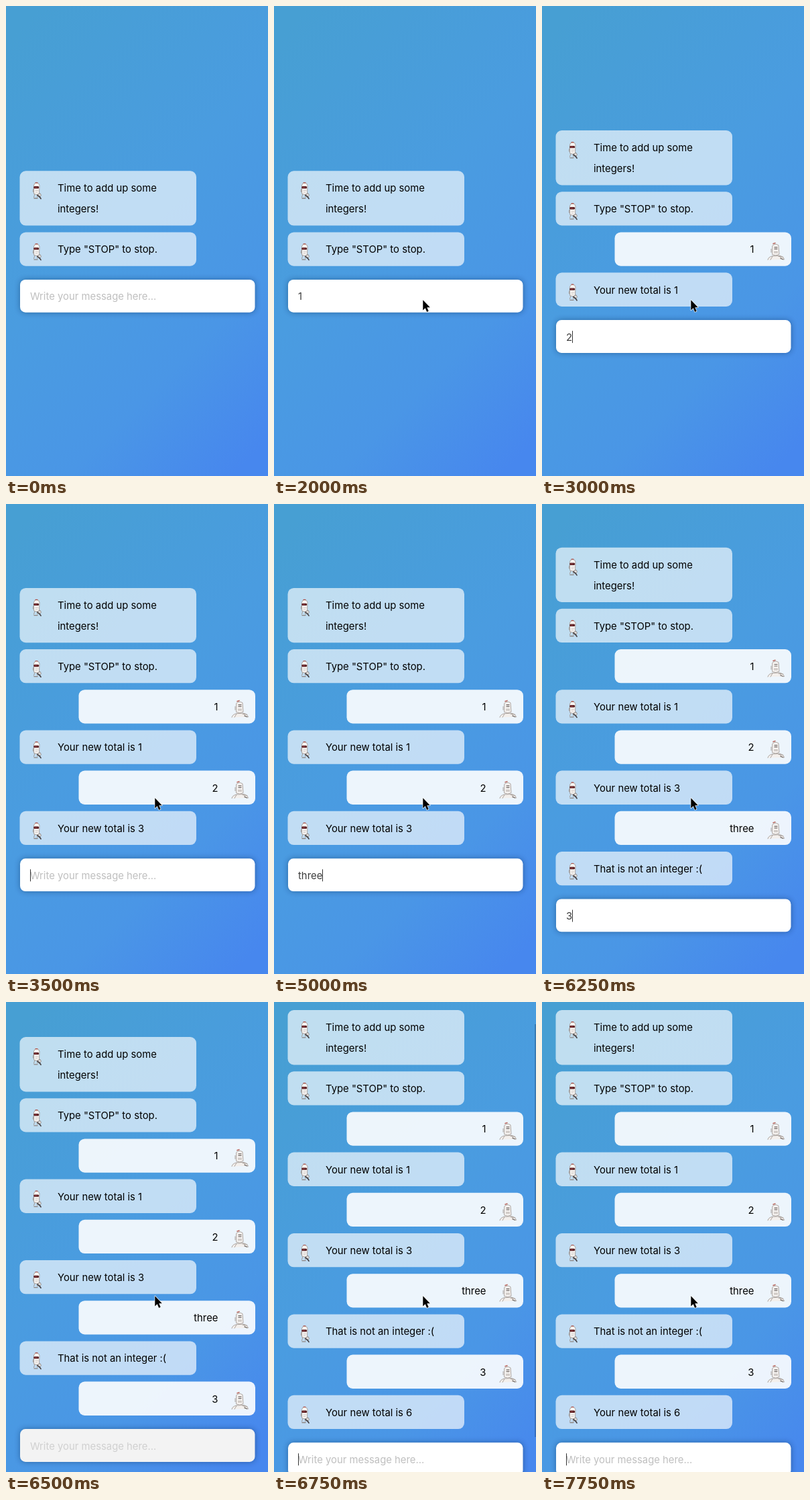
These frames come from a looping animation (391x699 px, 8000 ms). An HTML page:

```html
<!DOCTYPE html>
<html lang="en">
<head>
<meta charset="utf-8">
<title>Adding chat</title>
<style>
html, body { margin: 0; width: 100%; height: 100%; overflow: hidden; }
svg { display: block; width: 391px; height: 699px; }
text { font: 14.85px Inter, "Open Sans", sans-serif; white-space: pre; }
</style>
</head>
<body>
<svg id="stage" viewBox="0 0 391 699" xmlns="http://www.w3.org/2000/svg">
  <defs>
    <linearGradient id="sky" gradientUnits="userSpaceOnUse" x1="-50" y1="104" x2="441" y2="595">
      <stop offset="0" stop-color="#479fd3"/>
      <stop offset=".45" stop-color="#4a9ce0"/>
      <stop offset=".75" stop-color="#4a96e6"/>
      <stop offset="1" stop-color="#4787ee"/>
    </linearGradient>
    <filter id="blur" x="-20%" y="-60%" width="140%" height="220%"><feGaussianBlur stdDeviation="4.5"/></filter>
    <g id="bot" stroke-linecap="round" stroke-linejoin="round">
      <path d="M4.5 9 Q1.5 11 2.5 15 M5 18 L3.5 23 M8 18 L9 23" fill="none" stroke="#a39b97"/>
      <path d="M3.5 5 Q4 1.5 7.5 1.5 Q11.5 1.5 12 5 L11.5 18 Q8 20 4 18 Z" fill="#f7f5f3" stroke="#9b918c" stroke-width=".8"/>
      <path d="M6 1.3 H9" stroke="#b0524a" stroke-width="1.2"/>
      <rect x="3.2" y="6.6" width="8" height="3.4" rx="1.6" fill="#5b2226"/>
      <path d="M5 8.3 H8" stroke="#a8484a" stroke-width=".8"/>
      <path d="M6 13 H10 M6 15.5 H9" stroke="#c4bcb8" stroke-width=".8"/>
      <path d="M9 19 L13 17 L14.5 20 L12 23 Z" fill="#e5e1de" stroke="#77706d" stroke-width=".7"/>
      <path d="M9 20 L12 22 L14 25" fill="none" stroke="#464245" stroke-width="1.7"/>
      <path d="M4 24.5 H9" stroke="#8c8481" stroke-width="1.3"/>
    </g>
    <g id="human" stroke-linecap="round" stroke-linejoin="round" fill="none" stroke="#a59c97" stroke-width=".9">
      <path d="M8 5 Q12 1 17 4.5 L18 18 Q13 21 8 18.5 Z" fill="#f6f3f1"/>
      <path d="M9 2.2 L12 1.2" stroke="#bd6b62" stroke-width="1.6"/>
      <path d="M11 7.5 H15 M11 10 H15" stroke="#6e6663" stroke-width="1.2"/>
      <path d="M11 13.5 V16 M13 13.5 V16 M15 13.5 V16 M6 10 V15"/>
      <path d="M1 26 Q2 21.5 8 20.5 L18 20 Q24 20.5 25.5 25.5" fill="#f3efec"/>
      <path d="M5 26 L8 21 M19 20.5 L21 24 M17 21 L24 22"/>
      <path d="M20 24 L24 25.5" stroke="#77706c" stroke-width="1.3"/>
    </g>
  </defs>
  <rect id="back" width="391" height="699" fill="url(#sky)"/>
  <g id="chat"></g>
  <g id="field">
    <rect x="21" width="351" height="49" rx="8" fill="#06244c" opacity=".42" filter="url(#blur)"/>
    <rect id="box" x="21" width="350.5" height="48.8" rx="8"/>
    <text id="entry" x="36" y="30.6"></text>
    <rect id="caret" y="16" width="1" height="18" fill="#333"/>
  </g>
  <rect id="bar" x="389" y="33" width="2" height="614" fill="#16304f"/>
  <path id="arrow" d="M0 0 V15.2 L3.4 12 L5.9 17.6 L8.4 16.5 L6 11 H10.6 Z" fill="#000" stroke="#fff" stroke-width="1.3" stroke-linejoin="round" paint-order="stroke"/>
</svg>
<script>
const LOOP = 8000, STEP = 60.2, HINT = "Write your message here...";
const $ = id => document.getElementById(id);

// A leading ">" marks a message from the user.
const messages = ["Time to add up some|integers!", 'Type "STOP" to stop.', ">1", "Your new total is 1",
  ">2", "Your new total is 3", ">three", "That is not an integer :(", ">3", "Your new total is 6"];

// [start, message count, top of the chat]
const scenes = [[0, 2, 245.3], [2500, 4, 185.1], [3500, 6, 124.9], [5250, 8, 64.7], [6500, 9, 52.1], [6750, 10, 12.1]];

// [start, typed text, caret shown]
const typing = [[0, "", 0], [750, "", 1], [1250, "", 0], [1500, "1", 1], [2000, "1", 0], [2500, "", 1],
  [3000, "2", 1], [3500, "", 1], [4000, "", 0], [4500, "t", 1], [4750, "thre", 1], [5000, "three", 1],
  [5250, "", 1], [5750, "", 0], [6250, "3", 1], [6500, "", 0], [6750, "", 1], [7250, "", 0], [7750, "", 1]];

const pointer = [[0, -50, -50], [250, 231.3, 388.3], [500, 221.3, 437.3], [750, 222.3, 437.3]];
const scrollbar = [[0, 0], [6750, .3], [7000, .15], [7250, 0]];

const at = (track, t) => track.findLast(key => key[0] <= t);
const offset = i => i ? 91.1 + STEP * (i - 1) : 0;

function add(parent, tag, attrs, text = "") {
  const el = document.createElementNS("http://www.w3.org/2000/svg", tag);
  for (const name in attrs) el.setAttribute(name, attrs[name]);
  el.textContent = text;
  return parent.appendChild(el);
}

function bubble(message, i) {
  const mine = message[0] === ">";
  const lines = message.replace(">", "").split("|");
  const g = add($("chat"), "g", { transform: `translate(0 ${offset(i)})` });
  add(g, "rect", { x: mine ? 108.5 : 20.5, width: 263.5, height: lines.length > 1 ? 81.3 : 50.3, rx: 9,
    fill: "#fff", opacity: mine ? .9 : .66 });
  lines.forEach((line, n) => add(g, "text", { x: mine ? 316.5 : 77, y: 31 + n * 31,
    "text-anchor": mine ? "end" : "start" }, line));
  const face = add(g, "use", { href: mine ? "#human" : "#bot", x: mine ? 336 : 38, y: mine ? 15 : 16.2 });
  return { g, face };
}

const bubbles = messages.map(bubble);

function render(t) {
  const [, count, top] = at(scenes, t);
  const [, typed, caretOn] = at(typing, t);
  const [, px, py] = at(pointer, t);
  const locked = t >= 6500 && t < 6750;

  bubbles.forEach(({ g }, i) => g.setAttribute("display", i < count ? "inline" : "none"));
  // The first user portrait loads a moment late.
  bubbles[2].face.setAttribute("display", t < 2750 ? "none" : "inline");
  $("chat").setAttribute("transform", `translate(0 ${top})`);
  $("field").setAttribute("transform", `translate(0 ${top + offset(count - 1) + 70.5})`);

  $("box").setAttribute("fill", locked ? "#f3f3f3" : "#fff");
  $("entry").textContent = typed || HINT;
  $("entry").setAttribute("fill", typed ? "#3c3c3c" : locked ? "#d0d0d0" : "#bfbfbf");
  $("caret").setAttribute("x", 36 + (typed ? Math.round($("entry").getComputedTextLength()) : 0));
  $("caret").setAttribute("opacity", caretOn);

  $("arrow").setAttribute("transform", `translate(${px} ${py})`);
  $("bar").setAttribute("opacity", at(scrollbar, t)[1]);
  // The page grows once the chat no longer fits.
  $("back").setAttribute("transform", t >= 6750 ? "scale(1 1.06)" : "");
}

const start = performance.now();
function tick(now) {
  render(Math.max(0, now - start) % LOOP);
  requestAnimationFrame(tick);
}
render(0);
requestAnimationFrame(tick);
</script>
</body>
</html>
```
